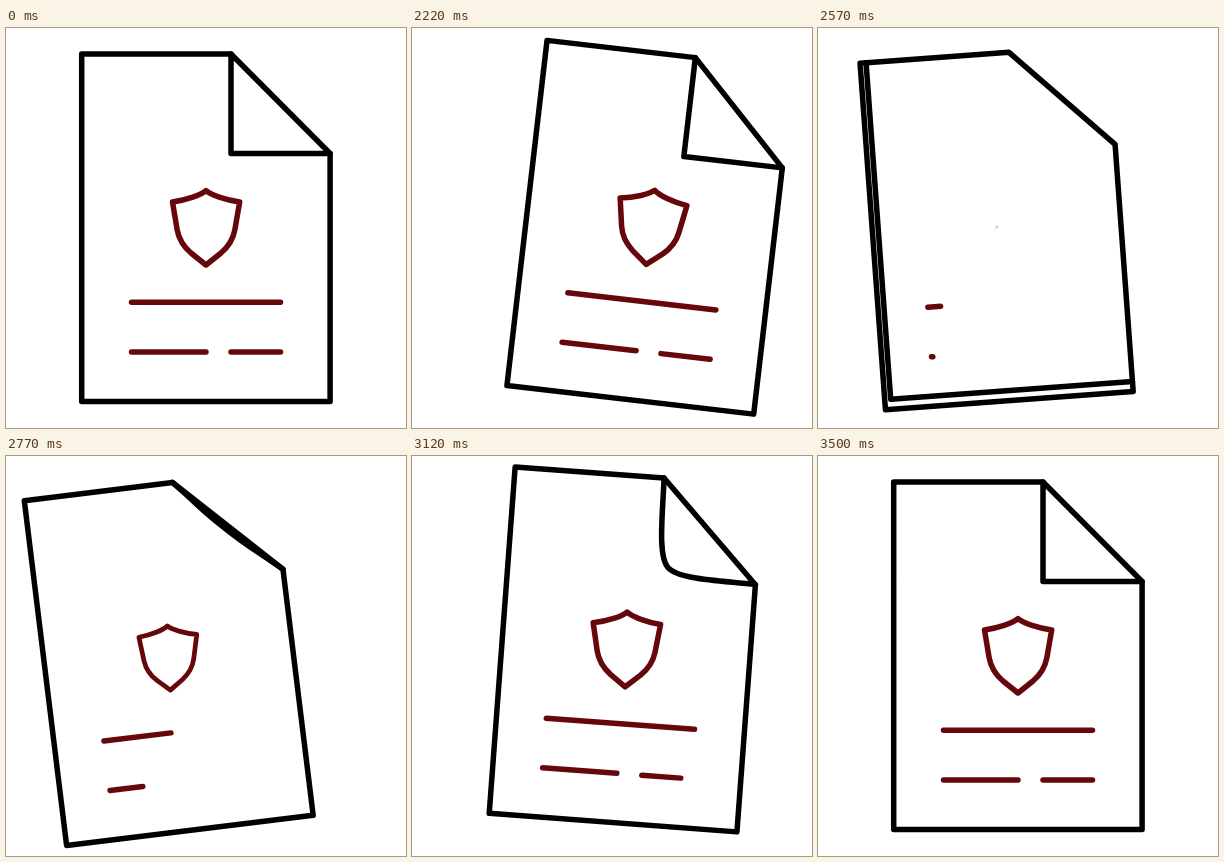
These frames come from a looping animation (400 px wide and 400 px high, 3.52 s). An HTML page with a canvas:

```html
<!DOCTYPE html>
<html lang="en">
<head>
<meta charset="utf-8">
<title>Document</title>
<style>
  html, body { margin: 0; width: 100%; height: 100%; overflow: hidden; background: #fff; }
  canvas { display: block; }
</style>
</head>
<body>
<canvas width="400" height="400"></canvas>
<script>
const ctx = document.querySelector('canvas').getContext('2d');
const LOOP = 3520, MOVE = 2020, TURN_START = 2360, TURN_END = 2600;
const LEFT = 75.7, TOP = 26, RIGHT = 324.1, BOTTOM = 373.4;
const FOLD_X = 225, FOLD_Y = 125.5, CX = 199.9, CY = 199.7;
const INK = '#000', ACCENT = '#66080b';

// Keys are [time, value, ...]
const POSE = [ // degrees, x, y
  [1995, 0, 0, 0], [2345, 9.3, 54, -1], [2450, 4.8, 22.8, -4.6], [2520, -1.8, -8.3, -2],
  [2690, -7.3, -38.8, 2.4], [2770, -7, -37.2, 2.3], [2970, -1, -3.9, -0.2],
  [3170, 4.9, 16, -7.2], [3300, 3.06, 8.4, -4.7], [3490, 0, 0, 0]
];
const SHIELD = [ // scale, degrees
  [2540, 0, 25], [2770, 0.86, 4.3], [2910, 1.13, -11], [2960, 1.115, -12.3],
  [3250, 0.945, 4], [3300, 0.953, 3.4], [3490, 1, 0]
];
const CURL = [[2700, 0], [2770, 0.05], [2970, 0.53], [3300, 0.97], [3480, 1]];

const shieldPath = new Path2D(
  'M200 162.5C195 167 181 172 166.5 174L171.2 202C173 212 178 219 185 225L200 237' +
  'L215 225C222 219 227 212 228.8 202L233.7 174C219 172 205 167 200 162.5Z');

const lerp = (a, b, p) => a + (b - a) * p;
const rad = deg => deg * Math.PI / 180;
const smooth = (t, from, to) => {
  const x = Math.min(1, Math.max(0, (t - from) / (to - from)));
  return x * x * (3 - 2 * x);
};

// Monotone cubic interpolation: flat at extremes, smooth in between
function sample(keys, t, col = 1) {
  const last = keys.length - 1;
  if (t <= keys[0][0]) return keys[0][col];
  if (t >= keys[last][0]) return keys[last][col];
  const slope = i => (keys[i + 1][col] - keys[i][col]) / (keys[i + 1][0] - keys[i][0]);
  const tangent = i => {
    if (i === 0 || i === last) return 0;
    const a = slope(i - 1), b = slope(i);
    return a * b > 0 ? 2 * a * b / (a + b) : 0;
  };
  const i = keys.findIndex(k => k[0] > t) - 1;
  const [t0, t1] = [keys[i][0], keys[i + 1][0]];
  const d = t1 - t0, x = (t - t0) / d;
  return lerp(keys[i][col], keys[i + 1][col], x * x * (3 - 2 * x))
    + d * x * (1 - x) * ((1 - x) * tangent(i) - x * tangent(i + 1));
}

function trace(points, close) {
  ctx.beginPath();
  points.forEach(p => ctx.lineTo(...p));
  if (close) ctx.closePath();
}

function line(x, y, length) {
  if (length <= 0) return;
  trace([[x, y], [x + length, y]]);
  ctx.stroke();
}

function content(scale, angle, first, second) {
  ctx.strokeStyle = ACCENT;
  line(125.5, 274.3, 149 * first);
  const drawn = 124 * second;
  line(125.5, 324, Math.min(drawn, 74.5));
  line(225, 324, drawn - 74.5);
  if (scale <= 0) return;
  ctx.save();
  ctx.translate(CX, CY);
  ctx.rotate(rad(angle));
  ctx.scale(scale, scale);
  ctx.translate(-CX, -CY);
  ctx.stroke(shieldPath);
  ctx.restore();
}

function newContent(t) {
  content(sample(SHIELD, t), sample(SHIELD, t, 2), smooth(t, 2446, 3140), smooth(t, 2526, 3250));
}

function turningFlap(t) {
  const p = smooth(t, TURN_START, TURN_END);
  const x = lerp(FOLD_X, LEFT, p), y = lerp(FOLD_Y, BOTTOM, p);
  const edge = [[x, TOP], [x, y], [RIGHT, y]];
  ctx.save();
  trace([...edge, [RIGHT, FOLD_Y], [FOLD_X, TOP]], true);
  ctx.fill();
  ctx.clip();
  if (p > 0) newContent(t);
  ctx.restore();
  ctx.strokeStyle = INK;
  trace(edge);
  ctx.stroke();
}

function curlingFlap(t) {
  const p = sample(CURL, t), q = 1 - p;
  const x = lerp((FOLD_X + RIGHT) / 2, FOLD_X, p);
  const y = lerp((TOP + FOLD_Y) / 2, FOLD_Y, p);
  const bend = 25 * Math.sqrt(q), lean = 33 * q * q;
  ctx.strokeStyle = INK;
  ctx.beginPath();
  ctx.moveTo(FOLD_X, TOP);
  ctx.bezierCurveTo(FOLD_X + lean, TOP + 33, x - bend, y - bend, x, y);
  ctx.bezierCurveTo(x + bend, y + bend, RIGHT - 33, FOLD_Y - lean, RIGHT, FOLD_Y);
  ctx.stroke();
}

function draw(t) {
  ctx.fillStyle = '#fff';
  ctx.fillRect(0, 0, 400, 400);
  ctx.lineWidth = 5.5;
  ctx.lineCap = ctx.lineJoin = 'round';
  ctx.save();
  if (t >= MOVE) {
    ctx.translate(CX + sample(POSE, t, 2), CY + sample(POSE, t, 3));
    ctx.rotate(rad(sample(POSE, t)));
    ctx.translate(-CX, -CY);
  }
  if (t < TURN_END) {
    content(1, 0, 1, 1);
    turningFlap(t);
  } else {
    newContent(t);
    curlingFlap(t);
  }
  ctx.strokeStyle = INK;
  trace([[LEFT, TOP], [FOLD_X, TOP], [RIGHT, FOLD_Y], [RIGHT, BOTTOM], [LEFT, BOTTOM]], true);
  ctx.stroke();
  ctx.restore();
}

const start = performance.now();
function tick() {
  draw((performance.now() - start) % LOOP);
  requestAnimationFrame(tick);
}
tick();
</script>
</body>
</html>
```
